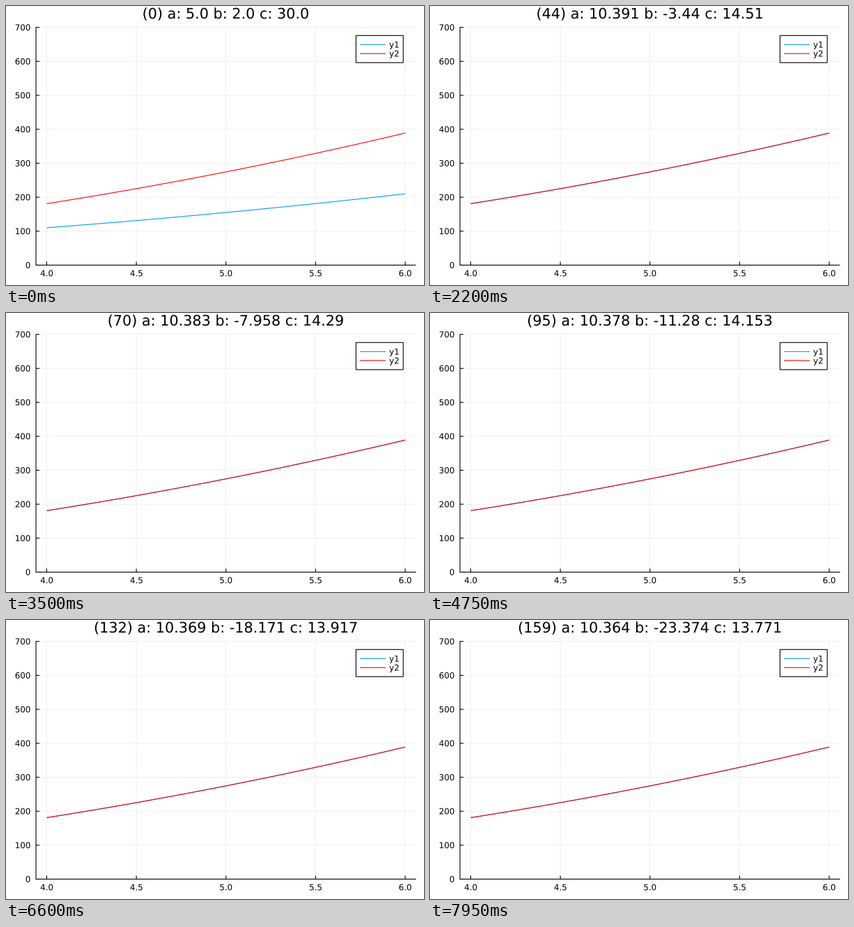
A matplotlib script for the animation above (8 s loop, 600 by 400 pixels).

```python
import numpy as np
import matplotlib.pyplot as plt
from matplotlib.animation import FuncAnimation
from matplotlib.patches import PathPatch
from matplotlib.textpath import TextPath
from matplotlib.transforms import Affine2D

W, H, DPI = 600, 400, 100
PX = 72 / DPI
FRAMES, INTERVAL = 160, 50
LEFT, RIGHT, TOP, BOTTOM = 43, 588.5, 30.7, 371.5
BLUE, RED = "#009afa", "#ff0000"
SMALL, LARGE = 11.85, 20.76
CAP = 0.729 * SMALL

plt.rcParams["font.family"] = "DejaVu Sans"

# Fitted parameters drifting along the flat valley of the error
STEPS = [0, 25, 44, 70, 95, 132, 159]
DRIFT_A = [10.403, 10.396, 10.391, 10.383, 10.378, 10.369, 10.364]
DRIFT_B = [2, -0.751, -3.44, -7.958, -11.28, -18.171, -23.374]
DRIFT_C = [14.86, 14.663, 14.51, 14.29, 14.153, 13.917, 13.771]
START_A, START_C = 5.0, 30.0
DECAY = 0.3

xs = np.linspace(4, 6, 21)
goal = 10.396 * xs**2 + 14.663
start = START_A * xs**2 + START_C


def px(x):
    return LEFT + (RIGHT - LEFT) * (x - 3.94) / 2.12


def py(y):
    return BOTTOM - (BOTTOM - TOP) * y / 700


fig = plt.figure(figsize=(W / DPI, H / DPI), dpi=DPI, facecolor="white")
ax = fig.add_axes([0, 0, 1, 1])
ax.set_xlim(0, W)
ax.set_ylim(H, 0)
ax.axis("off")


def line(x, y, color="black", width=1.1, **kw):
    return ax.plot(x, y, color=color, lw=width * PX, snap=False,
                   solid_capstyle="butt", **kw)[0]


def grid(x, y):
    line(x, y, width=0.6, alpha=0.1)


def text_path(x, base, text, size=SMALL, align=0.5):
    """Outline of text; align 0, 0.5 or 1 puts its left, middle or right at x."""
    path = TextPath((0, 0), text, size=size)
    box = path.get_extents()
    shift = x - box.x0 - align * box.width
    return Affine2D().scale(1, -1).translate(shift, base).transform_path(path)


def label(*args, **kw):
    patch = PathPatch(text_path(*args, **kw), fc="black", lw=0, zorder=5)
    return ax.add_patch(patch)


for v in np.arange(4, 6.1, 0.5):
    x = px(v)
    grid([x, x], [TOP, BOTTOM])
    line([x, x], [BOTTOM, BOTTOM - 5])
    label(x, 387.4, f"{v:.1f}")

for v in range(0, 701, 100):
    y = py(v)
    grid([LEFT, RIGHT], [y, y])
    line([LEFT, LEFT + 5], [y, y])
    label(34.6, y + CAP / 2, str(v), align=1)

line([LEFT, LEFT], [TOP - 0.5, BOTTOM + 0.5])
line([LEFT, RIGHT], [BOTTOM, BOTTOM])

fit = line(px(xs), py(start), BLUE)
line(px(xs), py(goal), RED)

ax.add_patch(plt.Rectangle((502.4, 42.3), 67.8, 38.9, fc="white", ec="black",
                           lw=1.1 * PX, snap=False, zorder=3))
for y, name, color in ((55.3, "y1", BLUE), (68.2, "y2", RED)):
    line([508, 545], [y, y], color, zorder=4)
    label(550.4, y + CAP / 2, name, align=0)


def title_path(text):
    return text_path(315.6, 18, text, LARGE)


title = ax.add_patch(PathPatch(title_path("(0)"), fc="black", lw=0))


def update(n):
    left = DECAY**n
    a = np.interp(n, STEPS, DRIFT_A)
    b = np.interp(n, STEPS, DRIFT_B)
    c = np.interp(n, STEPS, DRIFT_C)
    a += left * (START_A - a)
    c += left * (START_C - c)
    a, b, c = (round(float(v), 3) for v in (a, b, c))
    title.set_path(title_path(f"({n}) a: {a} b: {b} c: {c}"))
    fit.set_ydata(py(goal + left * (start - goal)))
    return fit, title


anim = FuncAnimation(fig, update, frames=FRAMES, interval=INTERVAL,
                     repeat=True, repeat_delay=0, blit=False)
plt.show()
```
